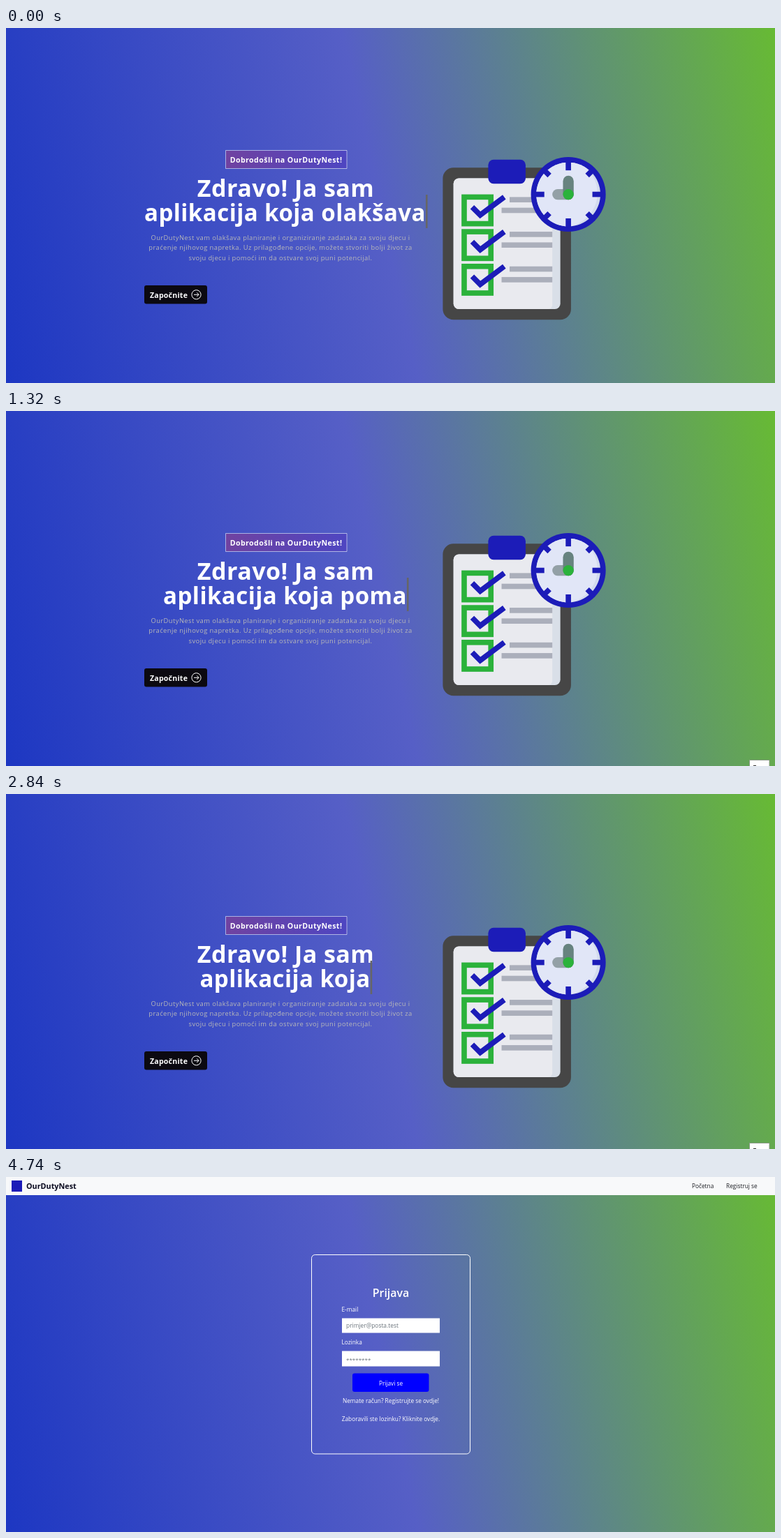
Write an HTML page with a canvas that moves like this. It is 1101 px wide and 509 px high and loops after 4.92 s.

```html
<!DOCTYPE html>
<html lang="hr">
<head>
<meta charset="utf-8">
<title>OurDutyNest</title>
<style>
  html, body { margin: 0; width: 100%; height: 100%; overflow: hidden; }
  canvas { display: block; }
</style>
</head>
<body>
<canvas id="stage" width="1101" height="509"></canvas>
<script>
const W = 1101, H = 509, LOOP = 4920;
const LOGIN_AT = 4740, FREEZE_AT = 4620;
const BRAND = 'OurDutyNest';
const BLUE = '#1c1cb8', GREEN = '#2bb23b', GRAY = '#abafbb';
const ctx = document.getElementById('stage').getContext('2d');

function text(str, x, y, size, { weight = 400, color = '#fff', align = 'left', spacing = 0 } = {}) {
  ctx.font = `${weight} ${size}px "Open Sans", "Noto Sans", sans-serif`;
  ctx.letterSpacing = spacing + 'px';
  ctx.textAlign = 'left';
  ctx.fillStyle = color;
  const width = ctx.measureText(str).width;
  const left = align === 'center' ? x - width / 2 : x;
  ctx.fillText(str, left, y);
  return left + width;
}

function box(x, y, w, h, r, fill, stroke) {
  ctx.beginPath();
  ctx.roundRect(x, y, w, h, r);
  if (fill) { ctx.fillStyle = fill; ctx.fill(); }
  if (stroke) { ctx.strokeStyle = stroke; ctx.lineWidth = 1; ctx.stroke(); }
}

function disc(x, y, r, fill) {
  ctx.beginPath();
  ctx.arc(x, y, r, 0, Math.PI * 2);
  ctx.fillStyle = fill;
  ctx.fill();
}

function line(points, width, color) {
  ctx.beginPath();
  points.forEach(([x, y]) => ctx.lineTo(x, y));
  ctx.lineWidth = width;
  ctx.strokeStyle = color;
  ctx.stroke();
}

function linear(x0, y0, x1, y1, ...colors) {
  const g = ctx.createLinearGradient(x0, y0, x1, y1);
  colors.forEach((c, i) => g.addColorStop(i / (colors.length - 1), c));
  return g;
}

// Linear interpolation through [time, ...values] keys.
function track(keys, t) {
  let i = 1;
  while (i < keys.length - 1 && t > keys[i][0]) i++;
  const a = keys[i - 1], b = keys[i];
  const k = Math.max(0, Math.min(1, (t - a[0]) / (b[0] - a[0])));
  return a.slice(1).map((v, j) => v + (b[j + 1] - v) * k);
}

// Typing runs at a steady pace; erasing halves its delay with every letter.
const typing = [[0, 'olakšava']];
function erase(word, at) {
  for (let n = word.length - 1, delay = 290; n >= 0; n--, delay /= 2) {
    typing.push([at, word.slice(0, n)]);
    at += delay;
  }
}
function type(word, at) {
  for (let n = 1; n <= word.length; n++) typing.push([at + (n - 1) * 148, word.slice(0, n)]);
}
erase('olakšava', 60);
type('pomaže', 820);
erase('pomaže', 2180);
type('organizuje', 2925);

const wordAt = t => typing.filter(([at]) => at <= t).pop()[1];

// Distance travelled by the floating picture, folded into an up-down motion.
const TRAVEL = [[0, 0], [460, 21.2], [1320, 62.4], [2020, 96.6], [2840, 132.6], [4040, 194], [4920, 237]];
const SWING = 21.6, TOP = -17;
function bob(t) {
  const p = (track(TRAVEL, Math.min(t, FREEZE_AT))[0] - TOP) % (SWING * 2);
  return TOP + (p < SWING ? p : SWING * 2 - p);
}

const POINTER = [[3580, 440, 505], [3600, 401, 477], [3630, 361, 461], [3670, 294, 441],
  [3700, 253, 424], [3740, 243, 408], [4260, 243, 408], [4340, 240, 384]];

function background() {
  const cx = 535, cy = 254, dx = 593, dy = -128;
  ctx.fillStyle = linear(cx - dx, cy - dy, cx + dx, cy + dy, '#1a35c2', '#565fc6', '#67ba34');
  ctx.fillRect(0, 0, W, H);
}

function headline(word, up, down) {
  const tag = linear(315, 0, 488, 0, 'rgba(150,54,130,.55)', 'rgba(74,47,189,.5)');
  box(315, 176 - up, 173, 25, 0, tag);
  box(314.5, 175.5 - up, 173.5, 26, 0, null, 'rgba(255,255,255,.55)');
  text(`Dobrodošli na ${BRAND}!`, 401, 192.5 - up, 10.6, { weight: 700, align: 'center', spacing: .43 });

  const big = { weight: 700, align: 'center', spacing: .43 };
  text('Zdravo! Ja sam', 400.5, 242 - up, 34.1, big);
  const lead = 'aplikacija koja';
  const wrapped = down > 0;
  let y = 277 - up, current = word ? `${lead} ${word}` : lead;
  if (wrapped) {
    text(lead, 400.5, y, 33.1, big);
    y += 35;
    current = word;
  }
  const end = text(current, 399.5, y, 33.1, big);
  ctx.fillStyle = '#666';
  ctx.fillRect(end, y - 38, 2.6, 48);

  const small = { color: '#b8b8b8', align: 'center', spacing: .43 };
  [`${BRAND} vam olakšava planiranje i organiziranje zadataka za svoju djecu i`,
    'praćenje njihovog napretka. Uz prilagođene opcije, možete stvoriti bolji život za',
    'svoju djecu i pomoći im da ostvare svoj puni potencijal.'
  ].forEach((s, i) => text(s, 393, 303.5 + i * 14.6 + down, 9.35, small));

  ctx.save();
  ctx.translate(0, down);
  box(198, 369, 90, 26.5, 3, '#0b0911');
  text('Započnite', 206, 386.5, 10.6, { weight: 700, spacing: .2 });
  ctx.beginPath();
  ctx.arc(272.5, 382.3, 6.6, 0, Math.PI * 2);
  ctx.lineWidth = 1;
  ctx.strokeStyle = '#fff';
  ctx.stroke();
  line([[269, 382.3], [276, 382.3]], 1, '#fff');
  line([[273.2, 379.4], [276, 382.3], [273.2, 385.2]], 1, '#fff');
  ctx.restore();
}

function clock() {
  ctx.save();
  ctx.translate(376, 80);
  disc(0, 0, 112, BLUE);
  disc(0, 0, 96, '#d3dbed');
  ctx.save();
  ctx.beginPath();
  ctx.arc(0, 0, 96, 0, Math.PI * 2);
  ctx.clip();
  disc(-15, -4, 102, '#e1e6f7');
  ctx.restore();
  for (let i = 0; i < 8; i++) {
    ctx.save();
    ctx.rotate(i * Math.PI / 4);
    ctx.fillStyle = BLUE;
    ctx.fillRect(-8, -100, 16, i % 2 ? 20 : 28);
    ctx.restore();
  }
  box(-48, -16, 64, 32, 16, '#93a0a6');
  box(-16, -56, 32, 72, 16, '#67837f');
  disc(0, 0, 16, GREEN);
  ctx.restore();
}

// The picture is laid out on an 8-unit icon grid with the board's corner at 0,0.
function clipboard(dy) {
  ctx.save();
  ctx.translate(625.4, 200.3 + dy);
  ctx.scale(.478, .478);
  box(0, 0, 384, 456, 32, '#464646');
  box(32, 32, 320, 392, 16, '#d9dfe8');
  box(32, 32, 296, 392, [16, 0, 12, 16], '#e9eaef');
  box(136, -24, 112, 72, 16, BLUE);
  for (let i = 0; i < 3; i++) {
    const y = 80 + i * 104;
    ctx.lineWidth = 16;
    ctx.strokeStyle = GREEN;
    ctx.strokeRect(64, y + 8, 80, 80);
    ctx.fillStyle = GRAY;
    ctx.fillRect(200, y + 8, 128, 16);
    ctx.fillRect(176, y + 40, 152, 16);
    line([[88, y + 38], [112, y + 62], [184, y + 8]], 16, BLUE);
  }
  clock();
  ctx.restore();
}

function pointer(x, y) {
  ctx.save();
  ctx.translate(x, y);
  ctx.beginPath();
  [[.5, .5], [.5, 14], [3.5, 11.2], [5.6, 16], [7.8, 15], [5.8, 10.4], [9.8, 10]]
    .forEach(([px, py]) => ctx.lineTo(px, py));
  ctx.closePath();
  ctx.fillStyle = '#fff';
  ctx.fill();
  ctx.lineWidth = 1;
  ctx.strokeStyle = '#15151f';
  ctx.stroke();
  ctx.restore();
}

function cornerTip() {
  box(1064.5, 500.5, 28.5, 12, 0, '#fff', '#8a9a86');
  ctx.fillStyle = '#333';
  ctx.fillRect(1070, 508, 4, 1);
}

function home(t) {
  const word = wordAt(t);
  const wrapped = word.length > 8;
  headline(word, wrapped ? 12 : 0, wrapped ? 23 : 0);
  clipboard(bob(t) + (wrapped ? 5.5 : 0));
  if (t >= 200 && t < 3040) cornerTip();
  if (t >= POINTER[0][0]) pointer(...track(POINTER, t));
}

function login() {
  const dark = { color: '#1d1f24' };
  const mid = { align: 'center' };
  const hint = { color: '#6c757d' };
  ctx.fillStyle = '#f8f9fa';
  ctx.fillRect(0, 0, W, 26);
  ctx.fillStyle = BLUE;
  ctx.fillRect(8, 5, 15, 16);
  text(BRAND, 29, 17, 10.8, { weight: 700, color: '#0b0b20' });
  text('Početna', 982, 16, 8.3, dark);
  text('Registruj se', 1031, 16, 8.3, dark);

  box(437.5, 111.5, 227, 285.5, 5, null, '#fff');
  text('Prijava', 551, 172, 15.9, { weight: 600, align: 'center' });
  text('E-mail', 480.5, 192.5, 8.3);
  box(481, 202.5, 140, 21, 0, '#fff');
  text('primjer@posta.test', 487, 216, 8.4, hint);
  text('Lozinka', 480.5, 240, 8.3);
  box(481, 249.5, 140, 22, 0, '#fff');
  text('********', 487, 265, 8, hint);
  box(496, 281.5, 109.5, 26.5, 3, '#0000ff');
  text('Prijavi se', 551, 298.5, 8.3, mid);
  text('Nemate račun? Registrujte se ovdje!', 551, 324, 8.3, mid);
  text('Zaboravili ste lozinku? Kliknite ovdje.', 551, 350, 8.3, mid);
}

function render(now) {
  const t = now % LOOP;
  background();
  if (t < LOGIN_AT) home(t);
  else login();
}

let start;
function tick(now) {
  start ??= now;
  render(now - start);
  requestAnimationFrame(tick);
}
render(0);
requestAnimationFrame(tick);
</script>
</body>
</html>
```
